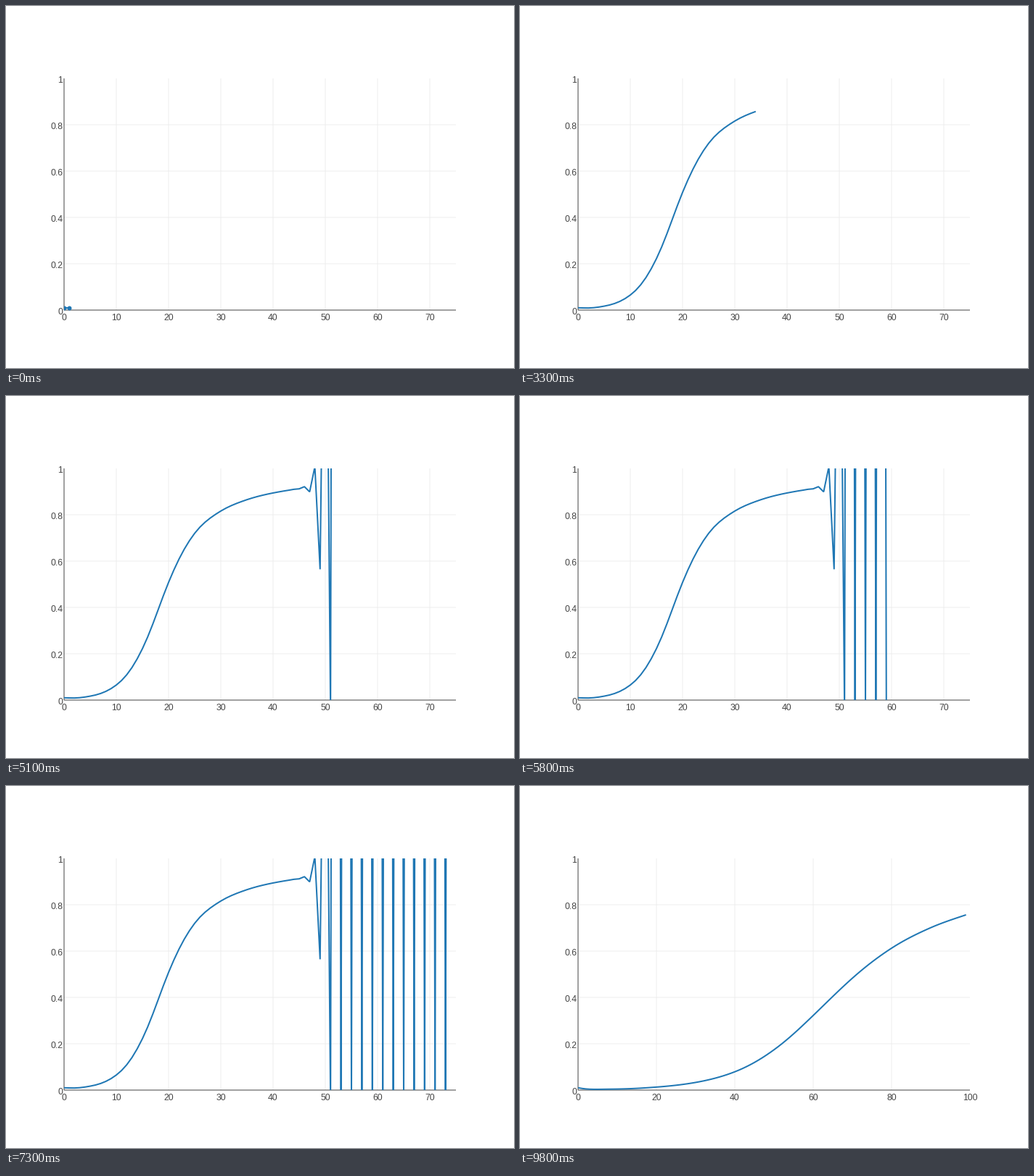
These frames come from a looping animation (700 px wide and 500 px high, 9900 ms). A matplotlib script:

```python
import numpy as np
import matplotlib.pyplot as plt
from matplotlib.animation import FuncAnimation
from matplotlib.patches import Rectangle

W, H, DPI = 700, 500, 100
LEFT, RIGHT, TOP, BOTTOM = 80, 620, 100, 420
PX = 72 / DPI                     # points per pixel
FRAMES, INTERVAL = 99, 100
SWITCH = 75                       # last point index at which the stable run takes over
MARKER_LIMIT = 20                 # markers only for short traces
BLUE, DARK, GRID = "#1f77b4", "#444444", "#eeeeee"

plt.rcParams["path.simplify"] = False
plt.rcParams["font.family"] = "Liberation Sans"


def growth(keys, x):
    """S-curve through key points: cubic Hermite on the log-odds."""
    kx, share = np.array(list(keys.items()), float).T
    ky = np.log(share / (1 - share))
    slope = np.gradient(ky, kx)
    k = np.clip(np.searchsorted(kx, x, side="right") - 1, 0, len(kx) - 2)
    h = kx[k + 1] - kx[k]
    t = (x - kx[k]) / h
    odds = ((1 + 2 * t) * (1 - t) ** 2 * ky[k]
            + t * (1 - t) ** 2 * h * slope[k]
            + t * t * (3 - 2 * t) * ky[k + 1]
            + t * t * (t - 1) * h * slope[k + 1])
    return 1 / (1 + np.exp(-odds))


def unstable_run():
    """Growth plus an alternating error that multiplies every step."""
    x = np.arange(76)
    smooth = growth({0: .010, 2: .009, 5: .017, 10: .065, 15: .222, 20: .508,
                     25: .720, 30: .816, 35: .865, 45: .913, 75: .957}, x)
    error = -.36 * (-4.2) ** (x - 49.0).astype(int).astype(float)
    return np.clip(smooth + error, -.05, 10)


def stable_run():
    return growth({0: .010, 3: .0038, 8: .004, 20: .013, 30: .033, 40: .079,
                   50: .174, 60: .322, 70: .483, 80: .6125, 90: .701,
                   100: .762}, np.arange(100))


def to_x(v, span):
    return LEFT + (RIGHT - LEFT) * np.asarray(v) / span


def to_y(v):
    return BOTTOM - (BOTTOM - TOP) * np.asarray(v)


fig = plt.figure(figsize=(W / DPI, H / DPI), dpi=DPI, facecolor="white")
ax = fig.add_axes([0, 0, 1, 1])
ax.set(xlim=(0, W), ylim=(H, 0))
ax.axis("off")


def rule(xs, ys, color, z):
    return ax.plot(xs, ys, color=color, lw=PX, zorder=z, snap=False,
                   solid_capstyle="butt")[0]


def label(x, y, text, align):
    return ax.text(x, y, text, ha=align, va="baseline", color=DARK,
                   fontsize=12.2 * PX)


def x_axis(span, step):
    """Vertical grid lines and tick labels for one x range."""
    parts = []
    for v in range(0, span + 1, step):
        x = to_x(v, span)
        parts.append(label(x, BOTTOM + 14, str(v), "center"))
        if 0 < v < span:
            parts.append(rule([x, x], [TOP, BOTTOM], GRID, 1))
    return parts


for i in range(6):
    y = to_y(i / 5)
    label(LEFT - 2, y + 6, f"{i / 5:g}", "right")
    if 0 < i < 5:
        rule([LEFT, RIGHT], [y, y], GRID, 1)
rule([LEFT, LEFT], [TOP, BOTTOM], DARK, 2)
rule([LEFT, RIGHT], [BOTTOM, BOTTOM], DARK, 2)

runs = [(75, unstable_run(), x_axis(75, 10)),
        (100, stable_run(), x_axis(100, 20))]

trace, = ax.plot([], [], color=BLUE, lw=2 * PX, zorder=3, snap=False,
                 solid_joinstyle="bevel", solid_capstyle="butt",
                 markersize=6 * PX, markeredgewidth=0)
trace.set_clip_path(Rectangle((LEFT, TOP), RIGHT - LEFT, BOTTOM - TOP,
                              transform=ax.transData))


def draw(frame):
    last = frame + 1
    active = int(last >= SWITCH)
    for n, (_, _, parts) in enumerate(runs):
        for part in parts:
            part.set_visible(n == active)
    span, values, _ = runs[active]
    steps = np.arange(last + 1)
    trace.set_data(to_x(steps, span), to_y(values[:last + 1]))
    trace.set_marker("o" if len(steps) < MARKER_LIMIT else "None")
    return [trace]


anim = FuncAnimation(fig, draw, frames=FRAMES, interval=INTERVAL,
                     init_func=lambda: draw(0), repeat=True)
plt.show()
```
